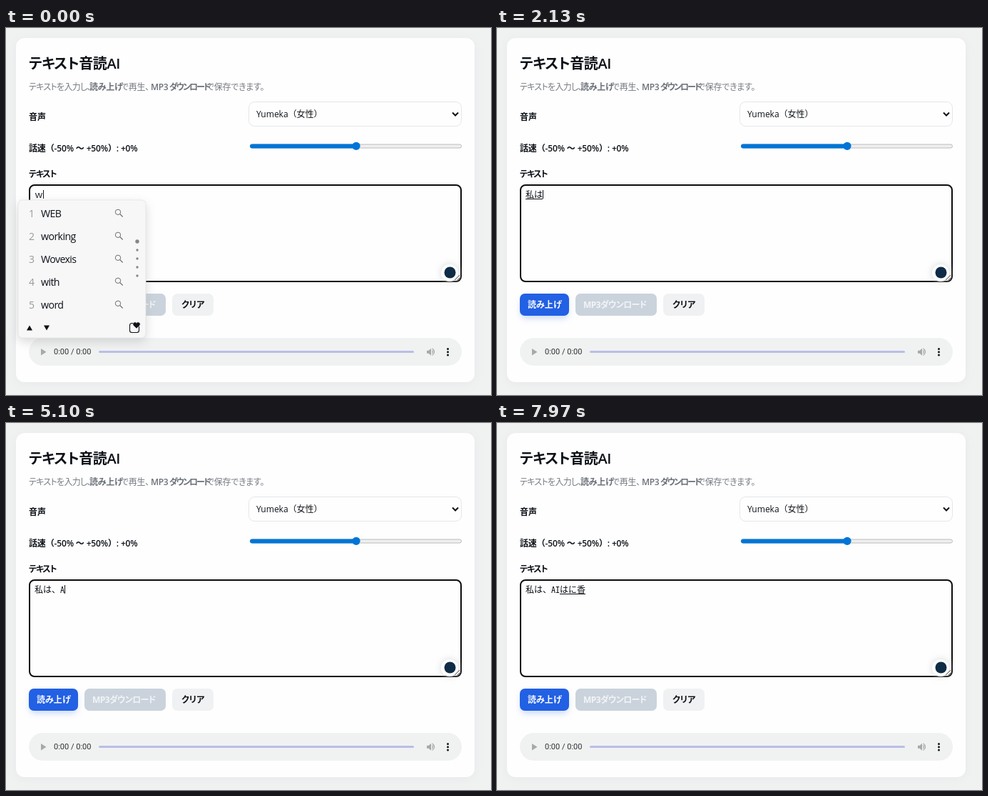
Recreate the animation shown at these times as an HTML page. Size 680x514 px, loop 8 s.

```html
<!DOCTYPE html>
<html lang="ja">
<head>
<meta charset="utf-8">
<title>テキスト音読AI</title>
<style>
html, body { margin: 0; width: 100%; height: 100%; overflow: hidden; background: #f0f1f1; }
svg { display: block; fill: #0d1117; }
text { font-family: "Open Sans", "Noto Sans CJK JP", "Noto Sans CJK", sans-serif; font-feature-settings: "palt"; white-space: pre; }
.full { font-feature-settings: normal; }
.mono { font-family: "Noto Sans Mono CJK JP", "Noto Sans CJK JP", "Noto Sans CJK", monospace; font-feature-settings: normal; }
.time { font-family: Roboto, sans-serif; }
</style>
</head>
<body>
<svg id="stage" width="680" height="514" viewBox="0 0 680 514">
  <defs>
    <filter id="soft" x="-30%" y="-30%" width="160%" height="160%"><feGaussianBlur stdDeviation="7"/></filter>
    <filter id="near" x="-30%" y="-50%" width="160%" height="200%"><feGaussianBlur stdDeviation="4"/></filter>
  </defs>
</svg>
<script>
const LOOP = 8000, BLINK = 530;
const INK = '#0d1117', BLUE = '#0075d7', PAPER = '#fefefe';
const stage = document.getElementById('stage');

function add(parent, tag, attrs, content) {
  const el = document.createElementNS('http://www.w3.org/2000/svg', tag);
  for (const key in attrs) el.setAttribute(key, attrs[key]);
  if (content) el.textContent = content;
  parent.appendChild(el);
  return el;
}
const box = (p, x, y, width, height, rx, fill, more) =>
  add(p, 'rect', { x, y, width, height, rx, fill, ...more });
const dot = (p, cx, cy, r, fill, more) => add(p, 'circle', { cx, cy, r, fill, ...more });
const shape = (p, d, fill, more) => add(p, 'path', { d, fill, ...more });
const line = (p, d, stroke, width, more) =>
  shape(p, d, 'none', { stroke, 'stroke-width': width, ...more });
const label = (p, x, y, size, str, more) =>
  add(p, 'text', { x, y, 'font-size': size, ...more }, str);

function drawHeader() {
  const grey = { fill: '#777b82', 'letter-spacing': -0.3 };
  const strong = { fill: '#6b7078', 'font-weight': 600, 'letter-spacing': -0.3 };
  label(stage, 32, 56.5, 20, 'テキスト音読AI', { 'font-weight': 600, 'letter-spacing': -0.4 });
  label(stage, 32, 86.5, 12, 'テキストを入力し、', { ...grey, 'letter-spacing': -0.7 });
  label(stage, 117, 86.5, 12, '読み上げ', strong);
  label(stage, 161, 86.5, 12, 'で再生、', grey);
  label(stage, 203, 86.5, 12, 'MP3', strong);
  label(stage, 229, 86.5, 12, 'ダウンロード', { ...strong, 'letter-spacing': -2 });
  label(stage, 281, 86.5, 12, 'で保存できます。', grey);
}

function drawSettings() {
  const semi = { 'font-weight': 600 };
  label(stage, 32, 129, 12, '音声', semi);
  box(stage, 340.5, 103.5, 298, 34, 8, PAPER, { stroke: '#e4e6ea' });
  label(stage, 351, 125, 12, 'Yumeka（女性）', { class: 'full', 'font-weight': 500 });
  line(stage, 'M626 118.5l4 4 4-4', INK, 2);

  label(stage, 32, 173, 12, '話速（-50% ～ +50%）: +0%',
    { ...semi, class: 'full', 'letter-spacing': -0.15 });
  box(stage, 342.5, 163, 296, 5, 2.5, '#efefef', { stroke: '#bcbcbc' });
  box(stage, 342, 162.5, 149, 6, 3, BLUE);
  dot(stage, 491, 165.3, 5.6, BLUE);

  label(stage, 32, 208.7, 12, 'テキスト', { ...semi, 'letter-spacing': -1.2 });
  box(stage, 33, 220, 605, 135, 7, PAPER, { stroke: '#0c0c0c', 'stroke-width': 2 });
}

function drawBadge() {
  dot(stage, 622, 343, 13, '#c8ccd0', { filter: 'url(#near)', opacity: 0.6 });
  dot(stage, 622, 343, 12, PAPER);
  line(stage, 'M629 353l7-7M633 353l3-3', '#555555', 1);
  dot(stage, 622.5, 342.5, 8, '#0f2b46');
}

function drawButtons() {
  const bold = { 'font-weight': 700 };
  box(stage, 33, 377, 67, 30, 8, '#9db8f0', { filter: 'url(#near)', opacity: 0.5 });
  box(stage, 32, 372, 69, 31, 7, '#2260e4');
  label(stage, 43, 392, 12, '読み上げ', { ...bold, fill: PAPER });
  box(stage, 110, 372, 114, 31, 7, '#cad3dc');
  label(stage, 121, 392, 12, 'MP3ダウンロード', { ...bold, fill: '#f2f4f7', 'letter-spacing': -0.6 });
  box(stage, 233, 372, 58, 31, 7, '#f0f1f2');
  label(stage, 246, 392, 12, 'クリア', bold);
}

function drawPlayer() {
  const faint = '#a6a8aa';
  box(stage, 32, 434, 607, 39, 19.5, '#f0f2f2');
  shape(stage, 'M49 449v9.5l7.5-4.75z', faint);
  label(stage, 67, 457.3, 11, '0:00 / 0:00', { class: 'time', fill: '#2c2e30' });
  box(stage, 130, 452, 442, 3, 1.5, '#b9bfe4');
  shape(stage, 'M590 451.7h2.6l3.4-3v10l-3.4-3h-2.6z', faint);
  line(stage, 'M597.5 451.3q2 2.4 0 4.8M597.6 448.8q6 4.9 0 9.8', faint, 1.2);
  for (const y of [449.5, 453.7, 457.9]) dot(stage, 619.5, y, 1.5, '#161616');
}

box(stage, 14, 16, 643, 482, 12, '#d8dade', { filter: 'url(#soft)', opacity: 0.35 });
box(stage, 14, 14, 643, 482, 12, PAPER);
drawHeader();
drawSettings();
const typed = label(stage, 40, 238, 12, '', { class: 'mono' });
const underline = box(stage, 40, 239, 0, 1, 0, INK);
const caret = box(stage, 40, 227, 1, 12, 0, INK);
drawBadge();
drawButtons();
drawPlayer();
const popup = add(stage, 'g', {});

const lists = {
  w: [179, 'WEB', 'working', 'Wovexis', 'with', 'word'],
  wa: [166, 'わ', '私', '私は', '和', '分かる'],
  wata: [166, '私は', 'わたしは', '私', '渡辺', '私の'],
  ha: [159, 'は', 'はい', '初めて', '反映', '場合'],
  han: [159, 'はに香', 'は', '発生', '反映', '初めて']
};

function drawPopup(name, x) {
  popup.replaceChildren();
  if (!name) return;
  const [w, ...words] = lists[name];
  popup.setAttribute('transform', `translate(${x} 0)`);
  box(popup, 0, 246, w, 193, 7, '#a8a8a8', { filter: 'url(#soft)', opacity: 0.45 });
  box(popup, 0, 241, w, 193, 6, '#f7f7f7', { stroke: '#e4e4e4', 'stroke-width': 0.8 });
  words.forEach((word, i) => {
    const y = 259 + i * 32, sx = w - 39;
    label(popup, 15, y + 5.5, 14, String(i + 1), { fill: '#999999' });
    label(popup, 32, y + 5.5, 14.2, word, { 'letter-spacing': -0.6 });
    dot(popup, sx, y - 1.2, 3.7, 'none', { stroke: '#6e6e6e' });
    line(popup, `M${sx + 2.7} ${y + 1.5}l4 4`, '#6e6e6e', 1.1);
    dot(popup, w - 12, 299 + i * 12, i ? 1.7 : 2.7, '#868686');
  });
  shape(popup, 'M12 423.5l4-7 4 7zM36 416.5h8l-4 7z', INK);
  const r = w - 16;
  box(popup, r - 6.5, 413.5, 13, 13, 3, 'none', { stroke: INK, 'stroke-width': 1.1 });
  shape(popup, `M${r + 3} 421l-4.6-4.6a2.7 2.7 0 0 1 4.6-3.2a2.7 2.7 0 0 1 4.6 3.2z`, INK,
    { stroke: '#f7f7f7', 'stroke-width': 0.6 });
}

// start time, committed text, composition, candidate list
const steps = [
  [0, '', 'ｗ', 'w'],
  [150, '', 'わ', 'wa'],
  [310, '', 'わｔ', 'wata'],
  [450, '', 'わた', 'wata'],
  [600, '', 'わたｓ', 'wata'],
  [760, '', 'わたし', 'wata'],
  [940, '', 'わたしｈ', 'wata'],
  [1080, '', 'わたしは', 'wata'],
  [1700, '', '私は'],
  [2700, '私は', ''],
  [3000, '私は', '、'],
  [3200, '私は、', ''],
  [5000, '私は、A', ''],
  [5200, '私は、AI', ''],
  [6430, '私は、AI', 'ｈ', 'ha'],
  [6570, '私は、AI', 'は', 'ha'],
  [6700, '私は、AI', 'はｎ', 'han'],
  [6850, '私は、AI', 'はに', 'han'],
  [7000, '私は、AI', 'はにｋ', 'han'],
  [7140, '私は、AI', 'はにか', 'han'],
  [7400, '私は、AI', 'はに香']
];

const span = str => [...str].reduce((sum, c) => sum + (c < '\u0080' ? 6 : 12), 0);
let shown = null;

function show(step) {
  const [, done, draft, list] = step;
  const from = 40 + span(done), to = from + span(draft);
  typed.textContent = done + draft;
  underline.setAttribute('x', from);
  underline.setAttribute('width', list ? 0 : to - from);
  caret.setAttribute('x', to);
  drawPopup(list, from - 23);
  shown = step;
}

function frame(now) {
  const t = now % LOOP;
  const step = steps.findLast(s => s[0] <= t);
  if (step !== shown) show(step);
  caret.setAttribute('opacity', (t - step[0]) % (2 * BLINK) < BLINK ? 1 : 0);
  requestAnimationFrame(frame);
}
frame(0);
</script>
</body>
</html>
```
